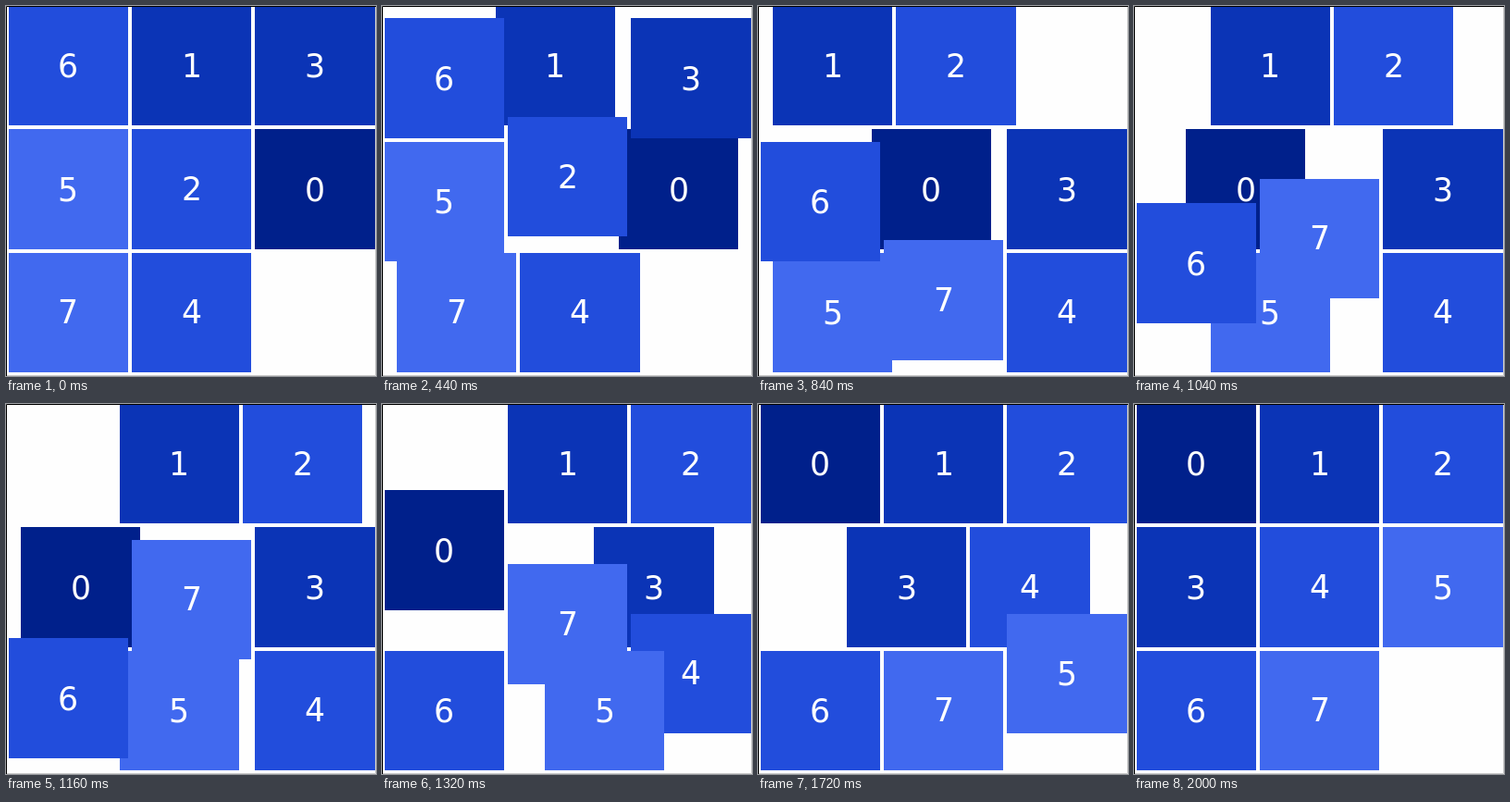
Animation of 400 by 400 pixels, one loop 3600 ms. Source, as an HTML page:

```html
<!DOCTYPE html>
<html lang="en">
<head>
<meta charset="utf-8">
<title>Sliding tiles</title>
<style>
  html, body { margin: 0; width: 100%; height: 100%; overflow: hidden; background: #fefefe; }
  svg { display: block; width: 400px; height: 400px; }
  text { font: 34.72px "DejaVu Sans", Verdana, sans-serif; fill: #fefefe; }
</style>
</head>
<body>
<svg id="stage" viewBox="0 0 400 400"></svg>
<script>
const LOOP = 3600, HOLD = 400, STEP_MS = 40, STEPS_PER_MOVE = 10, MOVES = 4;
const CELL = 400 / 3, SIZE = CELL * 0.97, INSET = CELL * 0.02;
const HALF_ADVANCE = 11.05;
const SHADES = ["#00208b", "#0b34b6", "#224ddc", "#4169ef"];
const DIRECTIONS = { L: [-1, 0], R: [1, 0], U: [0, -1], D: [0, 1], ".": [0, 0] };

// Tiles in number order: start column, start row, one move per cell.
const tiles = [
  [2, 1, "LLU."],
  [1, 0, "LR.."],
  [1, 1, "UR.."],
  [2, 0, "D.LL"],
  [1, 2, "R.UL"],
  [0, 1, "DRRU"],
  [0, 0, "DD.."],
  [0, 2, "RUD."]
].map(([col, row, path], number) => ({ col, row, path, number }));

const stage = document.getElementById("stage");

function add(tag, attributes) {
  const node = document.createElementNS("http://www.w3.org/2000/svg", tag);
  setAttributes(node, attributes);
  return stage.appendChild(node);
}

function setAttributes(node, attributes) {
  for (const name in attributes) node.setAttribute(name, attributes[name]);
}

for (const tile of tiles) {
  const { number } = tile;
  const shade = SHADES[Math.floor(number / 3) + number % 3];
  tile.box = add("rect", { fill: shade });
  tile.label = add("text", {});
  tile.label.textContent = number;
  // Round digits sit half a pixel lower than flat-footed ones.
  tile.drop = [0, 3, 5, 6].includes(number) ? 12.51 : 12;
}

add("path", { d: "M399.5 1V399.5H1", fill: "none", stroke: "#cccccc" });
add("path", { d: "M0.5 400V0.5H400", fill: "none", stroke: "#000000" });

function position({ col, row, path }, step) {
  [...path].forEach((move, i) => {
    const part = Math.min(1, Math.max(0, step / STEPS_PER_MOVE - i));
    const [dx, dy] = DIRECTIONS[move];
    col += dx * part;
    row += dy * part;
  });
  return [INSET + col * CELL, row * CELL];
}

function render(time) {
  const elapsed = Math.floor((time % LOOP - HOLD) / STEP_MS);
  const step = Math.min(MOVES * STEPS_PER_MOVE, Math.max(0, elapsed));
  for (const tile of tiles) {
    const [x, y] = position(tile, step);
    const left = Math.round(x), top = Math.round(y);
    setAttributes(tile.box, {
      x: left,
      y: top,
      width: Math.round(x + SIZE) - left,
      height: Math.round(y + SIZE) - top
    });
    setAttributes(tile.label, {
      x: Math.round(x + SIZE / 2 - HALF_ADVANCE),
      y: Math.round(y + SIZE / 2 + tile.drop)
    });
  }
}

const start = performance.now();
function tick() {
  render(performance.now() - start);
  requestAnimationFrame(tick);
}
tick();
</script>
</body>
</html>
```
